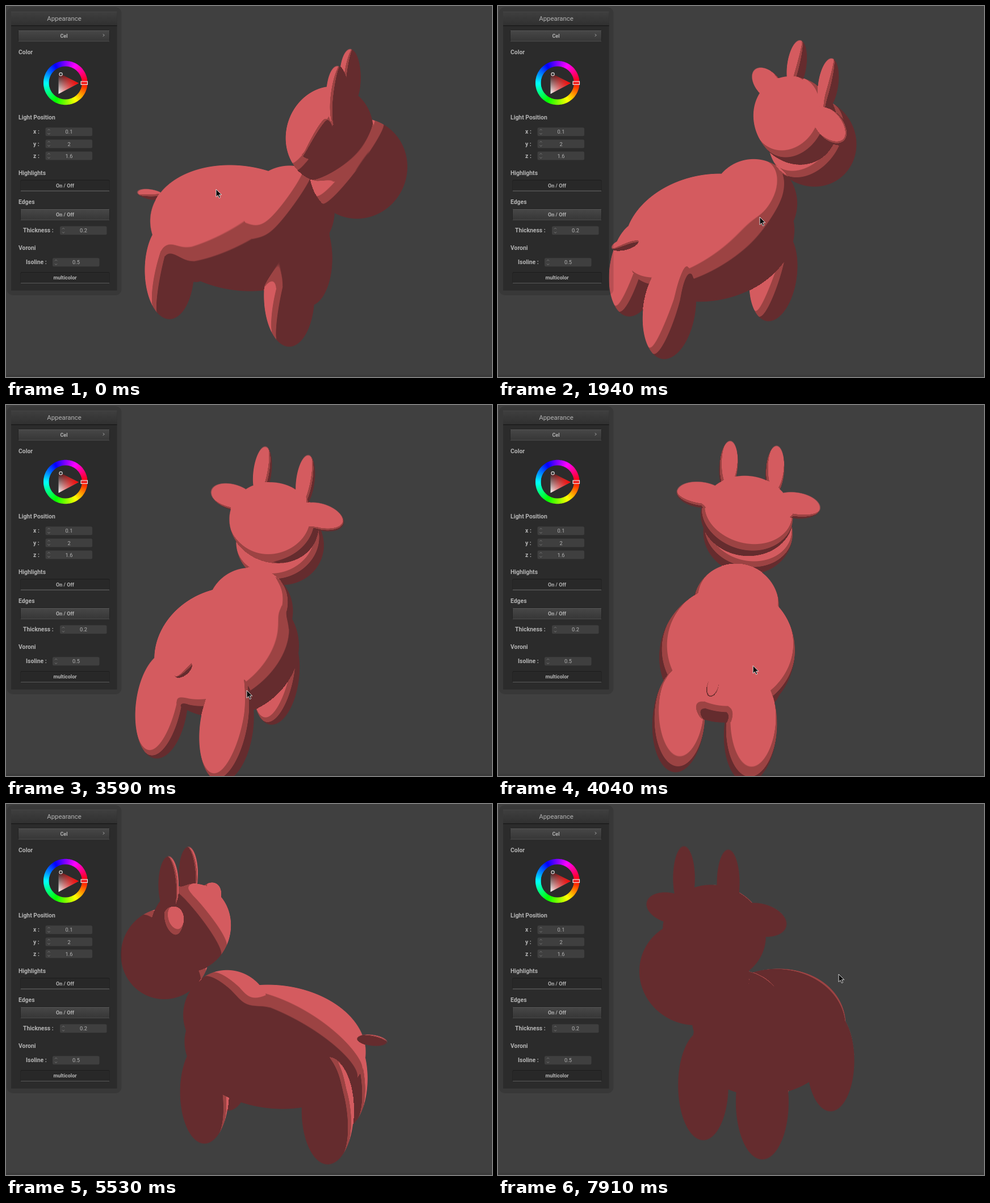
These frames come from a looping animation (856x654 px, 8000 ms). An HTML page with a canvas:

```html
<!DOCTYPE html>
<html lang="en">
<head>
<meta charset="utf-8">
<title>Cel shading viewer</title>
<style>
html,body{margin:0;width:100%;height:100%;overflow:hidden;background:#404040}
canvas,svg{position:absolute;left:0;top:0;width:856px;height:654px}
text{font-family:Roboto,sans-serif;fill:#b4b4b4;font-size:9.3px}
.b{font-weight:700}
</style>
</head>
<body>
<canvas id="view" width="856" height="654"></canvas>
<svg viewBox="0 0 856 654">
  <defs>
    <linearGradient id="head" x2="0" y2="1"><stop stop-color="#3f3f3f"/><stop offset="1" stop-color="#303030"/></linearGradient>
    <linearGradient id="btn" x2="0" y2="1"><stop stop-color="#474747"/><stop offset="1" stop-color="#373737"/></linearGradient>
    <linearGradient id="shade" x2="0" y2="1"><stop stop-color="#2a0808"/><stop offset="1" stop-color="#fff"/></linearGradient>
    <linearGradient id="hue"><stop stop-color="#f00" stop-opacity="0"/><stop offset="1" stop-color="#f00"/></linearGradient>
  </defs>
  <g id="panel"></g>
  <path id="cursor" d="M0 0V13.5L3.2 10.7 5.4 15.6 7.6 14.6 5.5 9.8H9.8Z" fill="#0b0b0b" stroke="#e8e8e8" stroke-width=".9"/>
</svg>
<script>
const STEP = 149.2, LOOP = 8000, LAST = 53;
const W = 856, H = 654, CAMERA = 1400, BLEND = 14;
const $ = id => document.getElementById(id);

// Ellipsoids of the cow: centre and radii along right, forward, up.
const single = [
  { at: [0, 0, -31], size: [120, 165, 108] },     // trunk
  { at: [0, 90, 20], size: [80, 78, 80] },        // shoulders and neck
  { at: [0, 152, 175], size: [85, 68, 75] },      // skull
  { at: [0, 203, 123], size: [86, 78, 80] },      // muzzle
  { at: [0, -172, 5], size: [9, 28, 10] }         // tail
];
const paired = [
  { at: [62, 113, -108], size: [44, 44, 100], gloss: 1 },
  { at: [62, -113, -108], size: [45, 45, 100], gloss: 1 },
  { at: [42, 170, 258], size: [17, 17, 52] },     // horn
  { at: [86, 152, 205], size: [46, 20, 25] }      // ear
];
const mirror = p => ({ ...p, at: [-p.at[0], p.at[1], p.at[2]] });
const parts = [...single, ...paired, ...paired.map(mirror)];

// Camera drag keys: heading, pitch and roll in degrees; light is in view space.
const keys = [
  { k: 0,  turn: [-20, 30, 0], pos: [412, 365], light: [-.75, .6, .15], mouse: [370, 323] },
  { k: 13, turn: [38, 33, 8],  pos: [376, 383], light: [-.6, .5, .62],  mouse: [461, 372] },
  { k: 24, turn: [68, 24, 7],  pos: [392, 408], light: [-.35, .4, .85], mouse: [424, 503] },
  { k: 32, turn: [110, 36, 0], pos: [428, 418], light: [.85, .2, .35],  mouse: [491, 387] },
  { k: 37, turn: [163, 24, 0], pos: [474, 400], light: [.65, .6, -.3],  mouse: [756, 400] },
  { k: 47, turn: [207, 20, 1], pos: [478, 386], light: [.4, .6, -.65],  mouse: [500, 388] },
  { k: 53, turn: [236, 18, 0], pos: [478, 373], light: [.25, .25, -.93], mouse: [600, 300] }
];

const DARK = [101, 44, 46], MID = [156, 67, 67], LIT = [212, 91, 95], WHITE = [253, 240, 240];

const blend = (a, b, f) => a.map((v, i) => v + (b[i] - v) * f);
const dot = (a, b) => a[0] * b[0] + a[1] * b[1] + a[2] * b[2];
const unit = v => v.map(c => c / Math.hypot(...v));
const clamp = v => Math.min(1, Math.max(0, v));

function poseAt(k) {
  let i = 0;
  while (i < keys.length - 2 && keys[i + 1].k <= k) i++;
  const a = keys[i], b = keys[i + 1], f = (k - a.k) / (b.k - a.k), out = {};
  for (const name of ['turn', 'pos', 'light', 'mouse']) out[name] = blend(a[name], b[name], f);
  return out;
}

// View axes expressed in model space.
function axes(turn) {
  const [h, p, r] = turn.map(d => d * Math.PI / 180);
  const { sin, cos } = Math;
  const x = [sin(h), cos(h), 0], y = [-cos(h) * sin(p), sin(h) * sin(p), cos(p)];
  return {
    right: x.map((v, i) => v * cos(r) + y[i] * sin(r)),
    up: y.map((v, i) => v * cos(r) - x[i] * sin(r)),
    near: [cos(h) * cos(p), -sin(h) * cos(p), sin(p)]
  };
}

const ctx = $('view').getContext('2d');
const image = ctx.createImageData(W, H);
// Per pixel: weight, normal x y z, gloss, coverage.
const [sum, nx, ny, nz, shine, cover] = Array.from({ length: 6 }, () => new Float32Array(W * H));

// Adds the front of one ellipsoid; nearer surfaces weigh more, so joints blend.
function addPart(part, view, pos) {
  const { right, up, near } = view;
  const depth = dot(part.at, near), zoom = CAMERA / (CAMERA - depth);
  const cx = pos[0] + dot(part.at, right) * zoom, cy = pos[1] - dot(part.at, up) * zoom;
  const inv = part.size.map(s => 1 / (s * zoom) ** 2);
  const form = (u, v) => u[0] * v[0] * inv[0] + u[1] * v[1] * inv[1] + u[2] * v[2] * inv[2];
  const reach = axis => zoom * Math.hypot(...axis.map((v, i) => v * part.size[i]));
  const rx = reach(right), ry = reach(up), edge = 2 * Math.min(rx, ry);
  const xx = form(right, right), yy = form(up, up), zz = form(near, near);
  const xy = form(right, up), xz = form(right, near), yz = form(up, near);
  const y1 = Math.min(H - 1, Math.ceil(cy + ry)), x1 = Math.min(W - 1, Math.ceil(cx + rx));
  for (let py = Math.max(0, Math.floor(cy - ry)); py <= y1; py++)
    for (let px = Math.max(0, Math.floor(cx - rx)); px <= x1; px++) {
      const x = px + .5 - cx, y = cy - py - .5;
      const b = x * xz + y * yz;
      const disc = b * b - zz * (x * x * xx + 2 * x * y * xy + y * y * yy - 1);
      if (disc <= 0) continue;
      const half = Math.sqrt(disc) / zz, t = half - b / zz;
      const a = Math.min(1, half * half / edge);
      const gx = x * xx + y * xy + t * xz, gy = x * xy + y * yy + t * yz, gz = b + t * zz;
      const w = a * Math.exp((depth * zoom + t) / BLEND), n = w / Math.sqrt(gx * gx + gy * gy + gz * gz);
      const i = py * W + px;
      sum[i] += w;
      nx[i] += gx * n;
      ny[i] += gy * n;
      nz[i] += gz * n;
      if (part.gloss) shine[i] += w;
      if (a > cover[i]) cover[i] = a;
    }
}

function paintCow(pose) {
  const view = axes(pose.turn), light = unit(pose.light);
  const glint = unit([light[0], light[1], light[2] + 1]);
  for (const layer of [sum, nx, ny, nz, shine, cover]) layer.fill(0);
  for (const part of parts) addPart(part, view, pose.pos);
  const out = image.data;
  for (let i = 0; i < W * H; i++) {
    out[i * 4 + 3] = cover[i] * 255;
    if (!cover[i]) continue;
    const n = Math.hypot(nx[i], ny[i], nz[i]);
    const lit = (nx[i] * light[0] + ny[i] * light[1] + nz[i] * light[2]) / n;
    const spec = (nx[i] * glint[0] + ny[i] * glint[1] + nz[i] * glint[2]) / n;
    const mid = clamp((lit - .15) * 60), full = clamp((lit - .35) * 60);
    const white = lit > .35 && shine[i] > sum[i] * .8 ? clamp((spec - .972) * 150) : 0;
    for (let c = 0; c < 3; c++) {
      let v = DARK[c] + (MID[c] - DARK[c]) * mid;
      v += (LIT[c] - v) * full;
      out[i * 4 + c] = v + (WHITE[c] - v) * white;
    }
  }
  ctx.putImageData(image, 0, 0);
  ctx.globalCompositeOperation = 'destination-over';
  ctx.fillStyle = '#3b3b3b';
  ctx.fillRect(0, 650, W, 4);
  ctx.globalCompositeOperation = 'source-over';
}

let shown = -1;
function draw(time) {
  const k = Math.min(LAST, Math.floor(time % LOOP / STEP));
  if (k === shown) return;
  shown = k;
  const pose = poseAt(k);
  paintCow(pose);
  $('cursor').setAttribute('transform', `translate(${pose.mouse})`);
  $('cursor').setAttribute('visibility', k > 36 && k < 44 ? 'hidden' : 'visible');
}

const rect = (x, y, w, h, fill, more = '') =>
  `<rect x="${x}" y="${y}" width="${w}" height="${h}" fill="${fill}" ${more}/>`;
const text = (x, y, s, size, more = '') =>
  `<text x="${x}" y="${y}" style="font-size:${size}px" ${more}>${s}</text>`;
const label = (x, y, s) => text(x, y + 3.8, s, 10.4, 'class="b"');
const CENTER = 'text-anchor="middle"';

function button(x, y, s, down) {
  const w = 182 - x;
  return rect(x - .5, y - .5, w + 1, 20, '#1d1d1d', 'rx="2"')
    + rect(x, y + .5, w, 18, down ? '#282828' : 'url(#btn)', 'rx="1.5"')
    + rect(x, y + (down ? 18.5 : 0), w, 1, '#565656')
    + rect(x, y + 18.5, w, 1, '#5a5a5a')
    + text((x + 182) / 2, y + 12.7, s, 9, CENTER + ' class="b"');
}

function spinner(x, y, s) {
  return rect(x, y - 7.5, 82.5, 15, '#3f3f3f', 'rx="2.5"')
    + `<path d="M${x + 4} ${y - 2.5}l2-2 2 2m-4 5l2 2 2-2" fill="none" stroke="#777"/>`
    + text(x + 41.5, y + 3.6, s, 9.3, CENTER);
}

function wheel(cx, cy) {
  let s = '';
  const n = 90, at = i => {
    const a = i / n * 2 * Math.PI;
    return `${cx + 34 * Math.cos(a)} ${cy + 34 * Math.sin(a)}`;
  };
  for (let i = 0; i < n; i++)
    s += `<path d="M${at(i - .2)}L${at(i + 1.2)}" stroke="hsl(${(i + .5) * 360 / n} 100% 50%)" stroke-width="9.5"/>`;
  for (const fill of ['shade', 'hue'])
    s += `<path d="M92.5 118L128 136 92.5 155Z" fill="url(#${fill})"/>`;
  return s + `<circle cx="96.5" cy="120.3" r="2.7" fill="#333" stroke="#ddd" stroke-width="1.1"/>`
    + rect(132, 133, 11.5, 5.5, '#e22', 'stroke="#eee" stroke-width="1.1"');
}

$('panel').innerHTML =
  rect(1.5, 2, 202, 508, '#000', 'rx="11" opacity=".13"')
  + rect(9, 9, 186.5, 492.5, '#2b2b2b')
  + rect(9, 10, 186.5, 25, 'url(#head)') + rect(9, 9.5, 186.5, 1, '#4b4b4b') + rect(9, 34, 186.5, 1.3, '#191919')
  + text(102.5, 26, 'Appearance', 11.4, CENTER)
  + button(22, 43, 'Cel') + '<path d="M171 49.5l2 2-2 2" fill="none" stroke="#bbb"/>'
  + label(22, 81.5, 'Color') + wheel(104.7, 135.5)
  + label(22, 196.5, 'Light Position')
  + [['x', '0.1'], ['y', '2'], ['z', '1.6']].map(([n, v], i) =>
      label(48, 221.5 + i * 21.3, n + ' :') + spinner(69.5, 221.7 + i * 21.2, v)).join('')
  + label(22, 294.5, 'Highlights') + button(26, 307, 'On / Off', true)
  + label(22, 345.5, 'Edges') + button(26, 358, 'On / Off')
  + label(30, 395.5, 'Thickness :') + spinner(95, 395.8, '0.2')
  + label(22, 426.5, 'Voroni')
  + label(35, 451.5, 'Isoline :') + spinner(82, 451.8, '0.5')
  + button(26, 469.5, 'multicolor', true);

const begin = performance.now();
function tick() {
  draw(performance.now() - begin);
  requestAnimationFrame(tick);
}
tick();
</script>
</body>
</html>
```
